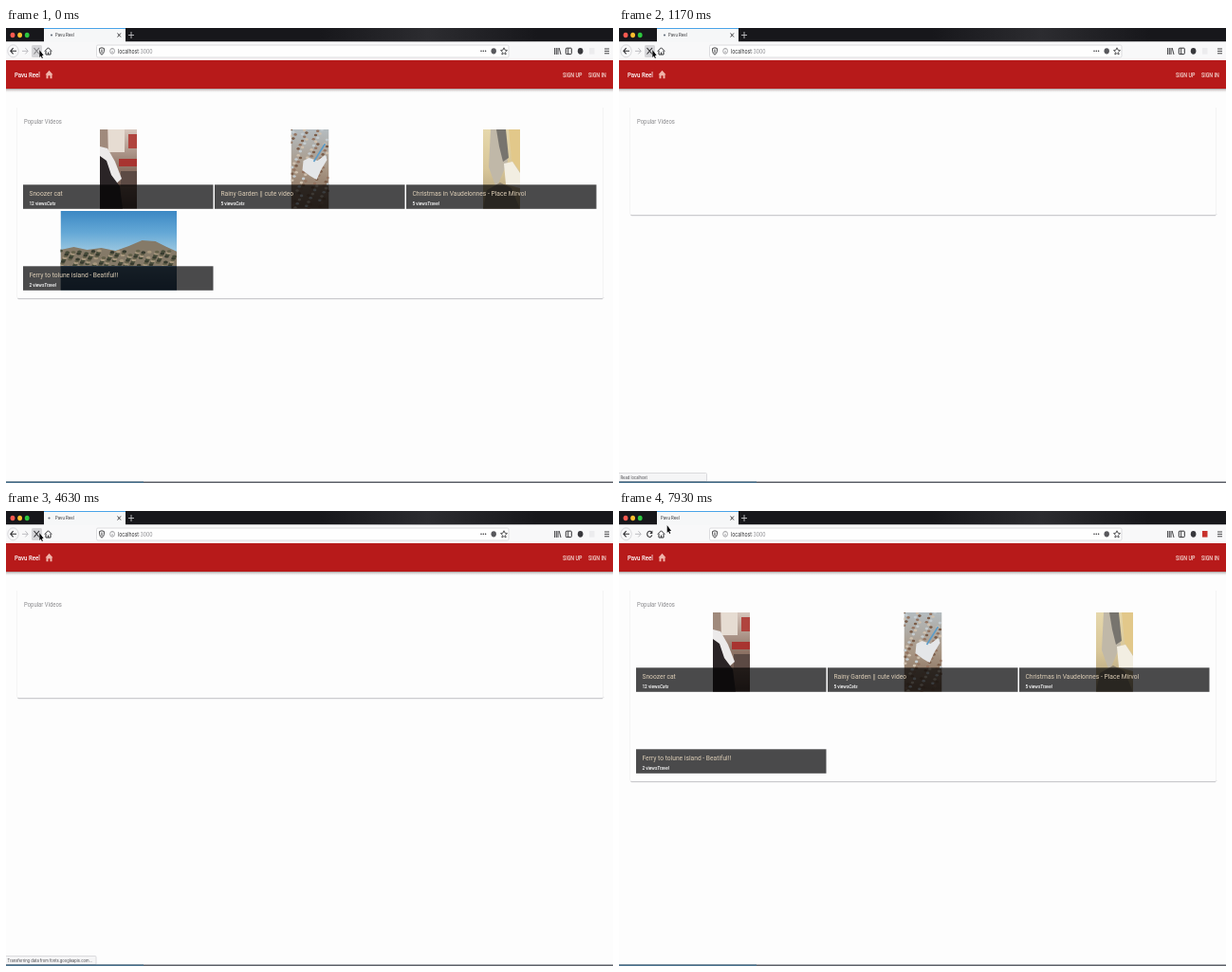
Write an HTML page with a canvas that moves like this. It is 640 px wide and 480 px high and loops after 8000 ms.

```html
<!DOCTYPE html>
<html lang="en">
<head>
<meta charset="utf-8">
<title>Video page reload</title>
<style>
html, body { margin: 0; width: 100%; height: 100%; overflow: hidden; background: #fdfdfd }
canvas { display: block }
</style>
</head>
<body>
<canvas id="stage" width="640" height="480"></canvas>
<script>
const c = document.getElementById('stage').getContext('2d');
const LOOP = 8000, SQUASH = 0.833;
const UI = 'Inter, sans-serif', WEB = 'Roboto, sans-serif';
const PAGE = '#fdfdfd', INK = '#303033', SITE = 'Pavu Reel';

// Start time and x of the loading dot in the tab
const DOTS = [[0, 48], [270, 46.5], [680, 45], [900, 46.5], [1170, 48], [1630, 45.5], [2070, 48],
  [2880, 46], [3200, 47.5], [3680, 45], [3950, 48], [4350, 47], [4630, 45.5]];

const TILES = [
  { x: 18, y: 107, px: 99, pw: 39, photo: cat, title: 'Snoozer cat', views: 12, tag: 'Cats' },
  { x: 220, y: 107, px: 300.5, pw: 40, photo: leaves, title: 'Rainy Garden || cute video', views: 5, tag: 'Cats' },
  { x: 422, y: 107, px: 503, pw: 39, photo: street, title: 'Christmas in Vaudelonnes - Place Mirvol', views: 5, tag: 'Travel' },
  { x: 18, y: 193, px: 57.5, pw: 122.5, photo: bay, title: 'Ferry to tolune island - Beatiful!!', views: 2, tag: 'Travel' }
];

function rect(color, x, y, w, h) {
  c.fillStyle = color;
  c.fillRect(x, y, w, h);
}

function box(x, y, w, h, r, fill, stroke) {
  c.beginPath();
  c.roundRect(x, y, w, h, r);
  if (fill) { c.fillStyle = fill; c.fill(); }
  if (stroke) { c.strokeStyle = stroke; c.lineWidth = 1; c.stroke(); }
}

function oval(color, x, y, rx, ry = rx) {
  c.beginPath();
  c.ellipse(x, y, rx, ry, 0, 0, 7);
  c.fillStyle = color;
  c.fill();
}

function shape(color, path) {
  c.fillStyle = color;
  c.fill(new Path2D(path));
}

function line(color, path, width = 1) {
  c.strokeStyle = color;
  c.lineWidth = width;
  c.stroke(new Path2D(path));
}

// The whole screen is narrowed by one factor, so all text is too. Returns the end x.
function text(s, x, y, size, color, family = WEB, style = '400') {
  c.save();
  c.translate(x, y);
  c.scale(SQUASH, 1);
  c.font = `${style} ${size}px ${family}`;
  c.fillStyle = color;
  c.fillText(s, 0, 0);
  const end = x + c.measureText(s).width * SQUASH;
  c.restore();
  return end;
}

function fade(y0, y1, ...colors) {
  const g = c.createLinearGradient(0, y0, 0, y1);
  colors.forEach((k, i) => g.addColorStop(i / (colors.length - 1), k));
  return g;
}

// Photos, drawn from their own top left corner
function cat() {
  rect(fade(0, 84, '#d6c6bc', '#8d7264', '#4c3c38'), 0, 0, 39, 84);
  rect('#e6dcd2', 9, 0, 17, 24);
  rect('#a08a7c', 0, 0, 8, 22);
  rect('#b0443e', 30, 5, 9, 15);
  rect('#a83430', 20, 31, 19, 8);
  rect('#5c4a44', 22, 44, 17, 16);
  shape('#eceaea', 'M0 18L8 20L16 34L23 52L14 60L0 52Z');
  shape('#2a2426', 'M0 28L7 33L12 48L21 60L24 84H0Z');
}

function leaves() {
  rect(fade(0, 84, '#b4bcc0', '#a89684', '#7c6250'), 0, 0, 40, 84);
  for (let i = 0; i < 110; i++) {
    const color = ['#7a5c48', '#cfc0ae', '#947460', '#c4ccd0'][i % 4];
    oval(color, i * 17.3 % 40, i * 29.7 % 84, 1.7, 1.3);
  }
  shape('#e4e6e8', 'M13 33L19 30L28 33L36 27L38 32L32 42L27 53L20 49L12 43Z');
  line('#5c9cc8', 'M24 34L36 15', 1.6);
}

function street() {
  rect(fade(0, 84, '#e6d8ac', '#d8c698', '#a89878'), 0, 0, 39, 84);
  shape('#c0b8a8', 'M8 0H22L26 34L14 62L6 40Z');
  shape('#77746e', 'M14 0H24L27 30L21 34L17 18Z');
  shape('#e2c88a', 'M27 0H39V44L30 32Z');
  shape('#f2eee2', 'M22 36L31 34L39 46V62L24 58Z');
  shape('#8c8270', 'M4 64L18 56L30 62L39 84H0Z');
}

function bay() {
  rect(fade(0, 46, '#3c88c4', '#64a8d6', '#a4cce2'), 0, 0, 123, 84);
  shape('#857a68', 'M0 41L14 38L28 41L43 39L58 42L72 37L86 31L100 32L112 38L123 43V60H0Z');
  for (let i = 0; i < 130; i++) {
    const x = i * 37.3 % 121;
    oval(['#454a38', '#a8987e', '#66624c', '#363a2e'][i % 4], x, 42 + i * 7.7 % 17, 2.4, 1.5);
  }
  rect(fade(58, 84, '#4a6880', '#2c4864'), 0, 58, 123, 26);
}

function tile(t, withPhoto) {
  if (withPhoto) {
    c.save();
    c.translate(t.px, t.y);
    c.beginPath();
    c.rect(0, 0, t.pw, 83.5);
    c.clip();
    t.photo();
    c.restore();
  }
  c.globalCompositeOperation = 'multiply';
  rect('#4a4a4b', t.x, t.y + 58.3, 200.5, 25.5);
  c.globalCompositeOperation = 'source-over';
  text(t.title, t.x + 6.4, t.y + 70, 8.05, '#dccdb6');
  const end = text(t.views + ' views', t.x + 6.4, t.y + 80, 5.7, '#fff', WEB, '500');
  text(t.tag, end, t.y + 80, 5.7, '#fff', WEB, 'italic 500');
}

function house(x, y, color) {
  shape(color, `M${x} ${y - 4.5}L${x + 4} ${y}H${x + 3}V${y + 4}H${x + 1}V${y + 1}H${x - 1}V${y + 4}H${x - 3}V${y}H${x - 4}Z`);
}

function chrome(t, loading) {
  rect('#17171b', 0, 0, 640, 14.5);
  const glow = c.createLinearGradient(330, 0, 560, 0);
  glow.addColorStop(0, '#2c2c3000');
  glow.addColorStop(0.5, '#2c2c30');
  glow.addColorStop(1, '#2c2c3000');
  rect(glow, 330, 0, 230, 14.5);
  ['#ff5a50', '#ffbd2e', '#2dc83e'].forEach((k, i) => oval(k, 7 + i * 7.6, 7.5, 2.4, 2.8));

  rect('#f6f7f8', 40, 0, 86, 15);
  rect('#4aa4e8', 40, 0, 86, 1);
  if (loading) {
    const x = DOTS.filter(d => d[0] <= t).pop()[1];
    oval('#66707c', x, 7.5, 1.1);
  }
  text(SITE, loading ? 52 : 44, 9.4, 5.1, INK, UI);
  line(INK, 'M117.5 5.5L121 9.5M121 5.5L117.5 9.5', 0.9);
  line('#c4c4c8', 'M132 4V11M129 7.5H135', 0.9);

  rect('#f8f8f9', 0, 14.5, 640, 19.5);
  c.beginPath();
  c.ellipse(7.5, 24.3, 5.7, 6.5, 0, 0, 7);
  c.strokeStyle = '#d0d0d4';
  c.lineWidth = 0.8;
  c.stroke();
  line(INK, 'M11 24.3H5M7.6 21.2L4.8 24.3L7.6 27.4', 1.1);
  line('#bcbcc0', 'M17 24.3H23M20.4 21.2L23.2 24.3L20.4 27.4', 1);

  if (loading) {
    box(27, 18, 11, 13, 1.5, '#d6d6d9');
    line(t < 270 ? '#808084' : INK, 'M29.5 21L35 27.5M35 21L29.5 27.5', 1.1);
  } else {
    line(INK, 'M34.2 22.2A2.6 3.1 0 1 0 34.8 25.3', 1.1);
    shape(INK, 'M35.3 20.5V24H32.3Z');
  }
  line(INK, 'M40.8 24.5L44.5 20.8L48.2 24.5M42 24V28H47V24M44.5 28V25.5', 1);

  box(95.5, 18, 434.5, 13, 1.5, '#fefefe', '#dcdcdf');
  line(INK, 'M98.6 21.5L101 20.8L103.4 21.5V24.5Q103 27 101 28.3Q99 27 98.6 24.5ZM101 22.5V26.5', 0.9);
  line('#808084', 'M109.7 24.3A2.4 2.9 0 1 1 114.5 24.3A2.4 2.9 0 1 1 109.7 24.3M112.1 24V26.3M112.1 22.3V23', 0.7);
  const end = text('localhost', 118, 26.6, 6.2, INK, UI);
  text(':3000', end, 26.6, 6.2, '#8c8c90', UI);
  [501, 503.3, 505.6].forEach(x => oval(INK, x, 24.3, 0.75));
  oval('#58585c', 514.2, 24.3, 2.7, 3.1);
  line(INK, 'M525 20.8L526 23.2L528.4 23.5L526.6 25.3L527.1 28L525 26.6L522.9 28L523.4 25.3L521.6 23.5L524 23.2Z', 0.8);

  line(INK, 'M578.6 21V28M580.3 21V28M582 21V28M583.2 21L585 28', 0.9);
  box(590.3, 21.2, 6, 6.4, 0.8, null, INK);
  line(INK, 'M592.6 21.5V27.5', 0.9);
  oval('#38383c', 605.6, 24.3, 2.8, 3.4);
  rect(loading ? '#ececee' : '#c8322c', 615, 21, 5.5, 6.6);
  line(INK, 'M631 22H636M631 24.4H636M631 26.8H636', 0.9);
}

function page(t) {
  const tiles = t < 900 || t >= 7930;
  rect('#b71a1a', 0, 34, 640, 30);
  rect(fade(64, 68, '#a8a4a4', '#e6e4e4', PAGE), 0, 64, 640, 4);
  text(SITE, 9, 52.2, 7.3, '#fff', WEB, '500');
  house(45.5, 49.2, '#f0b4aa');
  text('SIGN UP', 587, 51.6, 6.4, '#f4dcd6', WEB, '500');
  text('SIGN IN', 614, 51.6, 6.4, '#f4dcd6', WEB, '500');

  const bottom = tiles ? 285.5 : 197.5;
  line('#f4f4f4', `M11.5 84V${bottom - 1}M629.5 84V${bottom - 1}`);
  line('#cbcbce', `M12 ${bottom - 0.5}Q12.5 ${bottom} 14 ${bottom}H628Q629.5 ${bottom} 630 ${bottom - 1}`);
  rect('#f1f1f2', 13, bottom + 0.5, 616, 1);
  text('Popular Videos', 19, 101.2, 7.1, '#8c8c8f');
  if (tiles) TILES.forEach((k, i) => tile(k, t < 900 || i < 3));
}

function status(s, width) {
  box(-1, 469.5, width, 9, 1, '#f5f5f6', '#dadadd');
  text(s, 1.5, 476, 4.9, '#48484c', UI);
}

function cursor(x, y) {
  const path = `M${x} ${y}V${y + 8}L${x + 1.5} ${y + 6.4}L${x + 2.6} ${y + 9}L${x + 3.6} ${y + 8.5}L${x + 2.5} ${y + 6}H${x + 4.4}Z`;
  line('#fff', path, 1);
  shape('#08080a', path);
}

function draw(t) {
  const loading = t < 5600;
  rect(PAGE, 0, 0, 640, 480);
  if (t < 900 || t >= 1170) page(t);
  chrome(t, loading);
  if (t >= 900 && t < 1250) status('Read localhost', 93.5);
  else if (t >= 1250 && loading) status('Transferring data from fonts.googleapis.com...', 96);
  rect('#5c6068', 0, 478.5, 640, 1.5);
  rect('#48708c', 0, 478.5, 145, 1.5);
  if (t < 6020) cursor(35.3, 23);
  else cursor(50.7, 15);
}

function frame(now) {
  draw(now % LOOP);
  requestAnimationFrame(frame);
}
requestAnimationFrame(frame);
</script>
</body>
</html>
```
